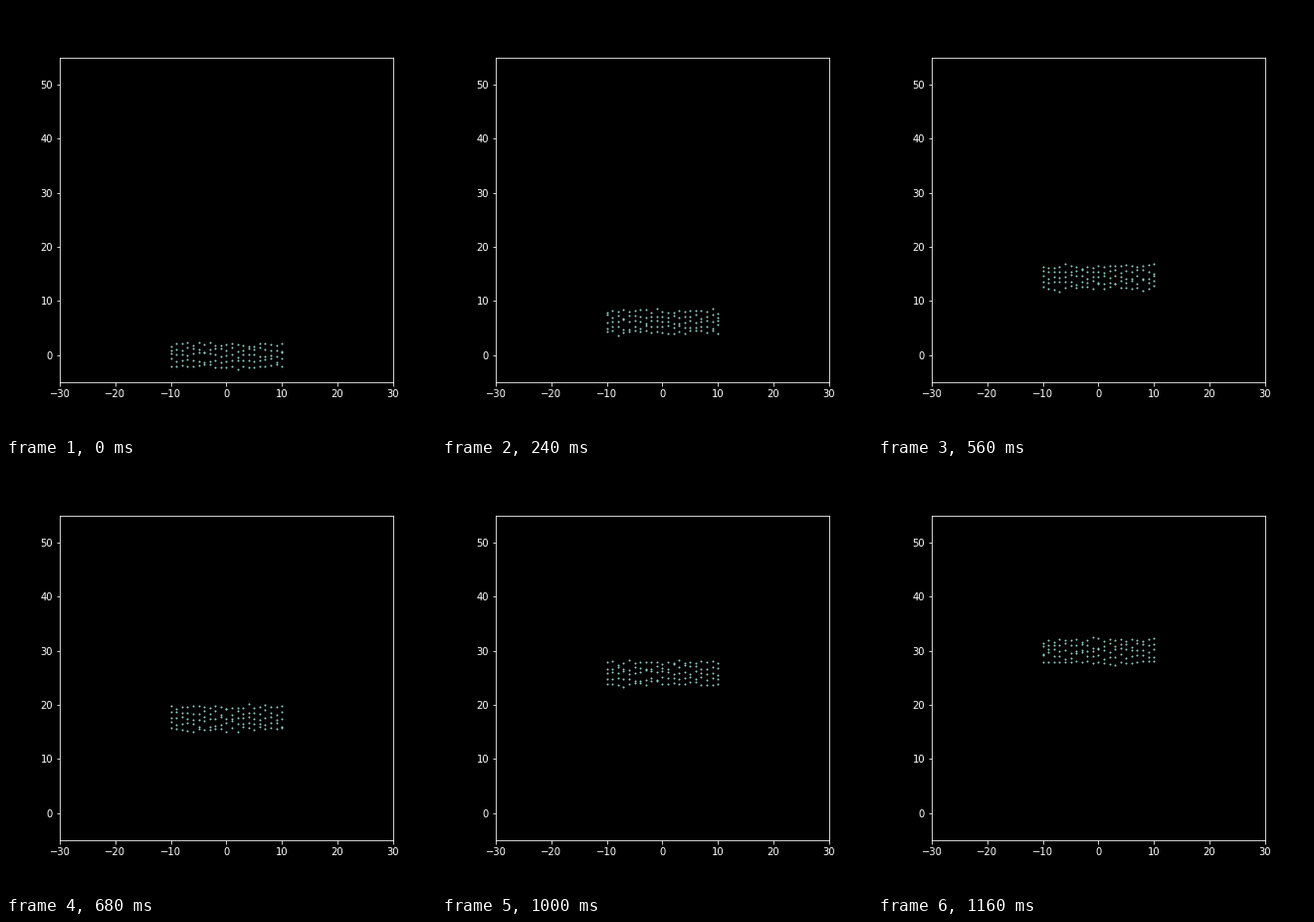
A matplotlib script that plays this animation: 432 px wide and 432 px high, repeating every 1200 ms.

```python
import matplotlib.pyplot as plt
import numpy as np
from matplotlib.animation import FuncAnimation

FRAMES = 30
INTERVAL = 40
RISE = 30
JITTER = 0.25

plt.style.use("dark_background")
plt.rcParams["font.family"] = "DejaVu Sans"
plt.rcParams["font.size"] = 10

fig, ax = plt.subplots(figsize=(6, 6), dpi=72)
fig.subplots_adjust(left=0.125, right=0.9, bottom=0.125, top=0.88)
ax.set(xlim=(-30, 30), ylim=(-5, 55))

grid_x, grid_y = np.meshgrid(np.arange(-10, 11), np.arange(-2, 3))
dots, = ax.plot([], [], "o", color="#8dd3c7", markersize=1)


def update(frame):
    """Lift the block of particles steadily, with fresh vertical jitter."""
    rng = np.random.default_rng(frame)
    height = RISE * frame / (FRAMES - 1)
    noise = rng.normal(0, JITTER, grid_y.shape)
    dots.set_data(grid_x.ravel(), (grid_y + height + noise).ravel())
    return dots,


anim = FuncAnimation(fig, update, frames=FRAMES, interval=INTERVAL,
                     repeat=True, repeat_delay=0)
plt.show()
```
